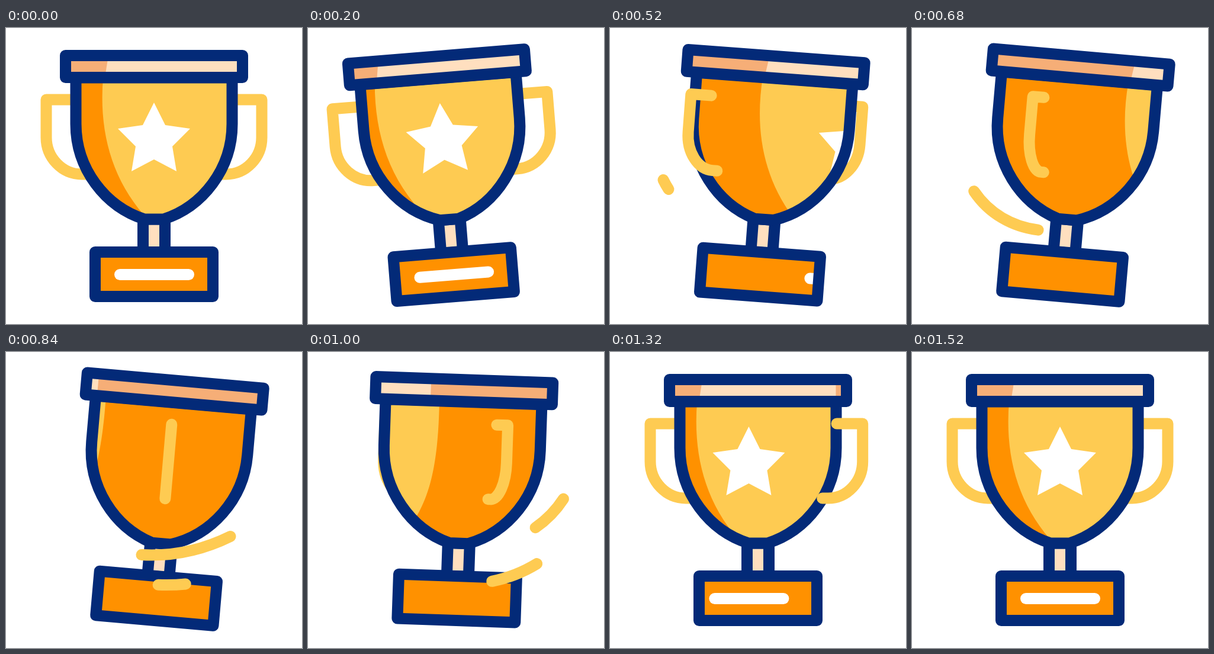
An HTML page for the animation above (1800 ms loop, 500 px wide and 500 px high).

```html
<!DOCTYPE html>
<html lang="en">
<head>
<meta charset="utf-8">
<title>Trophy spin</title>
<style>
  html, body { margin: 0; width: 100%; height: 100%; overflow: hidden; background: #fff; }
  svg { display: block; width: 100%; height: 100%; }
  .line { fill: none; stroke: #032a78; stroke-width: 19; stroke-linejoin: round; }
  .gold { fill: none; stroke: #fecb52; stroke-width: 19; stroke-linecap: round; stroke-linejoin: round; }
  .shade { fill: #ff9100; }
  .dark { fill: #f6ae77; }
</style>
</head>
<body>
<svg viewBox="0 0 500 500">
  <defs>
    <path id="bowl" d="M118 84V162C118 238 168 302 234 323H266C332 302 382 238 382 162V84Z"/>
    <clipPath id="inBowl"><use href="#bowl"/></clipPath>
    <clipPath id="inRim"><rect x="100.5" y="46.5" width="299" height="37"/></clipPath>
    <clipPath id="inBase"><rect x="150.5" y="378.5" width="199" height="75"/></clipPath>
  </defs>
  <g id="cup">
    <path id="back" class="gold"/>
    <path id="rest" class="gold"/>

    <rect x="231.5" y="323" width="37" height="56" fill="#ffdfbf"/>
    <rect x="231.5" y="323" width="37" height="56" class="line"/>

    <g clip-path="url(#inBowl)">
      <use href="#bowl" fill="#fecb52"/>
      <path id="bowlShade" class="shade"/>
      <path id="bowlShade2" class="shade"/>
      <path id="star" fill="#fff" d="M250 126L269 164L311 170L281 200L288 242L250 222L212 242L219 200L189 170L231 164Z"/>
    </g>
    <use href="#bowl" class="line"/>

    <g clip-path="url(#inRim)">
      <rect x="100" y="46" width="300" height="38" fill="#ffdfbf"/>
      <path id="rimShade" class="dark"/>
      <path id="rimShade2" class="dark"/>
    </g>
    <rect x="100.5" y="46.5" width="299" height="37" class="line"/>

    <g clip-path="url(#inBase)">
      <rect x="150" y="378" width="200" height="76" class="shade"/>
      <path id="slot" d="M192.5 416.5H308.5" stroke="#fff" stroke-width="19" stroke-linecap="round"/>
    </g>
    <rect x="150.5" y="378.5" width="199" height="75" class="line"/>

    <path id="streakA" class="gold" pathLength="1" d="M75 269C105 320 155 345 209 345C270 345 325 327 373 296C395 281 412 262 424 242"/>
    <path id="streakB" class="gold" pathLength="1" d="M251 393C310 390 350 375 383 353"/>
    <path id="front" class="gold"/>
  </g>
</svg>
<script>
  const LOOP = 1800, STEP = 40, LAST = 1520;
  const el = {};
  document.querySelectorAll('svg [id]').forEach(n => el[n.id] = n);

  // Smooth move from a to b between times t0 and t1
  function ease(t, t0, t1, a, b) {
    const p = Math.min(1, Math.max(0, (t - t0) / (t1 - t0)));
    return a + (b - a) * p * p * (3 - 2 * p);
  }

  const setPath = (node, d) => node.setAttribute('d', d);
  const show = (node, on) => node.setAttribute('visibility', on ? 'visible' : 'hidden');

  // The arms shorten as the handle turns edge-on at the axis x = 250
  function handle(x) {
    const k = (250 - x) / 182, at = d => x + d * k;
    return `M${at(45)} 121H${x}V185C${x} 219 ${at(27)} 247 ${at(60)} 247H${at(70)}`;
  }

  // Bowl shading between a ")" edge at l and a "(" edge at r
  function bowlBand(l, r) {
    return `M${l} 84C${l + 2} 200 ${l - 12} 265 ${l - 57} 316H${r + 70}` +
      `C${r + 13} 250 ${r - 6} 170 ${r + 1} 84Z`;
  }

  const rimBand = (l, r) => `M${l} 46V84H${r - 3}L${r + 3} 46Z`;

  function streak(node, tail, head) {
    const len = head - tail;
    show(node, len > 0.001);
    node.setAttribute('stroke-dasharray', `${Math.max(len, 0.001)} 3`);
    node.setAttribute('stroke-dashoffset', -tail);
  }

  function tilt(t) {
    if (t < 240) return ease(t, 0, 240, 0, -5);
    if (t < 840) return ease(t, 240, 575, -5, 5);
    return ease(t, 840, 1120, 5, 0);
  }

  function draw(t) {
    el.cup.setAttribute('transform', `rotate(${tilt(t)} 250 463)`);

    const turning = t > 280 && t < 1400;
    const near = handle(ease(t, 280, 1400, 68, 432));
    setPath(el.front, near);
    setPath(el.rest, near);
    show(el.front, turning);
    show(el.rest, !turning);
    setPath(el.back, handle(t < 840 ? ease(t, 280, 840, 432, 355) : ease(t, 840, 1255, 143, 68)));

    const right = t < 290 ? ease(t, 0, 200, 170, 149) : ease(t, 290, 890, 149, 413);
    const left = ease(t, 760, 1440, 109, 406);
    const next = ease(t, 1080, 1440, 105, 170);
    setPath(el.rimShade, left < right ? rimBand(left, right) : '');
    setPath(el.rimShade2, rimBand(60, next));
    setPath(el.bowlShade, bowlBand(left + 15, right - 7));
    setPath(el.bowlShade2, bowlBand(60, next - 7));

    const shift = t < 840 ? ease(t, 280, 740, 0, 267) : ease(t, 920, 1390, -260, 0);
    el.star.setAttribute('transform', `translate(${shift} 0)`);
    el.slot.setAttribute('transform', `translate(${shift} 0)`);

    streak(el.streakA, ease(t, 600, 1140, 0, 1), ease(t, 450, 1000, 0, 1));
    streak(el.streakB, ease(t, 850, 1190, 0, 1), ease(t, 740, 1000, 0, 1));
  }

  const start = performance.now();
  function tick() {
    const t = (performance.now() - start) % LOOP;
    draw(Math.min(LAST, Math.floor(t / STEP) * STEP));
    requestAnimationFrame(tick);
  }
  draw(0);
  requestAnimationFrame(tick);
</script>
</body>
</html>
```
